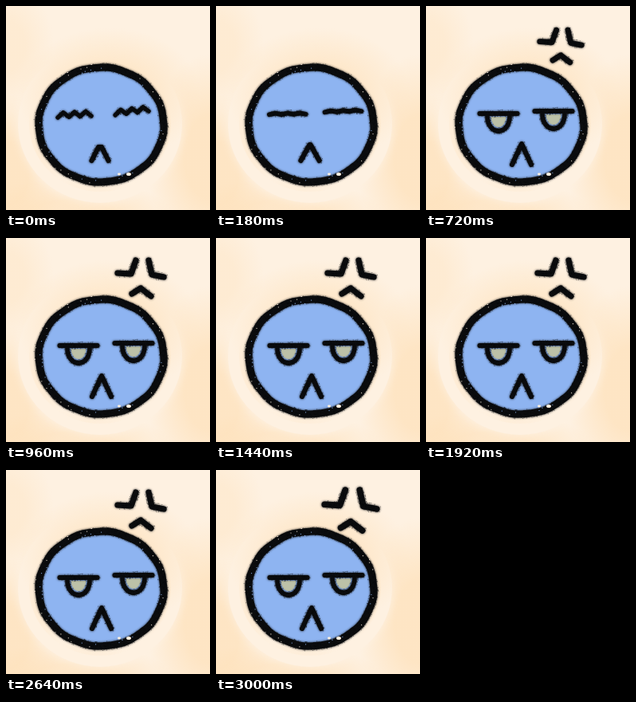
An HTML page with a canvas for the animation above (3.03 s loop, 256x256 px).

```html
<!DOCTYPE html>
<html lang="en">
<head>
<meta charset="utf-8">
<title>Annoyed face</title>
<style>
html, body { margin: 0; width: 100%; height: 100%; overflow: hidden; background: #fef0df; }
canvas { display: block; width: 100vw; height: 100vh; }
</style>
</head>
<body>
<canvas id="stage" width="256" height="256"></canvas>
<script>
const ctx = document.getElementById('stage').getContext('2d');
const LOOP = 3030, INK = '#0b0c0e', CREAM = '#fef1e1', BLUE = '#8eb4f1', IRIS = '#bcc1a8';
const HEAD = { x: 119.5, y: 149, rx: 78.5, ry: 72 };

let seed = 1;
const rand = () => (seed = seed * 16807 % 2147483647) / 2147483647;
const clamp = v => Math.min(1, Math.max(0, v));
const mix = (a, b, p) => a + (b - a) * p;
const points = (n, f) => Array.from({ length: n + 1 }, (_, i) => f(i / n, i));
const onHead = (a, off) => [HEAD.x + (HEAD.rx + off) * Math.cos(a), HEAD.y + (HEAD.ry + off) * Math.sin(a)];

function disc(x, y, rx, ry, color, end = Math.PI * 2) {
  ctx.fillStyle = color;
  ctx.beginPath();
  ctx.ellipse(x, y, rx, ry, 0, 0, end);
  ctx.fill();
}

// Charcoal line: a soft core with loose grains around it
function charcoal(pts, width, core = 0.75) {
  ctx.strokeStyle = ctx.fillStyle = ctx.shadowColor = INK;
  ctx.lineCap = ctx.lineJoin = 'round';
  ctx.lineWidth = width * core;
  ctx.shadowBlur = 3;
  ctx.beginPath();
  pts.forEach(([x, y]) => ctx.lineTo(x, y));
  ctx.stroke();
  ctx.shadowBlur = 0;
  ctx.globalAlpha = 0.5;
  seed = 77;
  for (let i = 1; i < pts.length; i++) {
    const [x0, y0] = pts[i - 1], [x1, y1] = pts[i];
    for (let n = Math.hypot(x1 - x0, y1 - y0) * 4; n > 0; n--) {
      const p = rand(), a = rand() * 7, r = Math.sqrt(rand()) * (width / 2 + 0.8);
      ctx.fillRect(mix(x0, x1, p) + Math.cos(a) * r - 0.5, mix(y0, y1, p) + Math.sin(a) * r - 0.5, 1, 1);
    }
  }
  ctx.globalAlpha = 1;
}

function glow(x, y, rx, ry, alpha) {
  ctx.save();
  ctx.translate(x, y);
  ctx.scale(rx, ry);
  const g = ctx.createRadialGradient(0, 0, 0.4, 0, 0, 1);
  g.addColorStop(0, `rgba(254,224,184,${alpha})`);
  g.addColorStop(1, 'rgba(254,224,184,0)');
  ctx.fillStyle = g;
  ctx.fillRect(-1, -1, 2, 2);
  ctx.restore();
}

function backdrop() {
  ctx.fillStyle = CREAM;
  ctx.fillRect(0, 0, 256, 256);
  glow(0, 50, 60, 80, 0.35);
  glow(0, 210, 70, 100, 0.7);
  glow(256, 190, 80, 130, 0.7);
  glow(80, 262, 130, 45, 0.6);
  ctx.strokeStyle = ctx.shadowColor = CREAM;
  ctx.shadowBlur = 12;
  ctx.lineWidth = 14;
  ctx.beginPath();
  ctx.ellipse(118, 148, 96, 92, 0, 0, 7);
  ctx.stroke();
  ctx.shadowBlur = 0;
  glow(130, 112, 115, 85, 0.6);
}

function head() {
  disc(HEAD.x, HEAD.y, HEAD.rx, HEAD.ry, BLUE);
  charcoal(points(90, p => onHead(p * Math.PI * 2, Math.sin(p * 75) * 0.4)), 10.2, 0.88);
  // Worn spots in the rim
  seed = 5;
  for (let i = 0; i < 45; i++) {
    const off = mix(-5, 5, rand());
    const [x, y] = onHead(rand() * 7, off);
    disc(x, y, 0.6, 0.6, off < 0 ? BLUE : CREAM);
  }
  disc(154, 211, 3, 2, CREAM);
  disc(142, 211, 2, 1.4, CREAM);
}

// A zigzag squint that flattens into a lid, then opens
function eye(x, y, squintX, tilt, flat, open) {
  if (open > 0) {
    disc(x, y + 4, 9.5, 13, IRIS, Math.PI);
    for (const side of [-1, 1])
      charcoal(points(8, p => {
        const a = p * open * Math.PI / 2;
        return [x + side * 14 * Math.cos(a), y + 4 + 18 * Math.sin(a)];
      }), 7.5);
  }
  const mid = mix(squintX, x, flat), half = mix(21, 23.5, flat), lift = 1 - flat;
  charcoal(points(6, (p, i) => [
    mid + half * (2 * p - 1),
    y + lift * (2 + (i % 2 ? -3 : 3) - tilt * p)
  ]), mix(7, 8, flat));
}

function mouth(flat, rise) {
  const x = 118 + rise * 2, blunt = 2 * (1 - flat), top = 177 - 4 * flat;
  const spread = 10.5 + flat * 1.5, foot = 194 + rise * 5;
  charcoal([[x - spread, foot], [x - blunt, top], [x + blunt, top], [x + spread, foot]], 8);
}

// Three chevrons that swell around a shared hub
const HUB = [169, 50];
const CHEVRONS = [
  [[140, 44], [157, 45], [163, 28]],
  [[179, 28], [183, 46], [198, 49]],
  [[158, 70], [169, 63], [182, 73]]
];
function temper(size) {
  for (const chevron of CHEVRONS)
    charcoal(chevron.map(pt => pt.map((v, k) => mix(HUB[k], v, size))), 5 + 4.5 * size);
}

// Poses are held, as in hand-drawn animation
function hold(t) {
  if (t >= 240 && t < 480) return 240;
  const step = t < 120 ? 30 : t < 840 ? 60 : 120;
  return Math.floor(t / step) * step;
}

function draw(t) {
  const flat = clamp(t / 240), rise = clamp((t - 480) / 240);
  const open = t < 480 ? 0 : mix(0.5, 1, rise);
  backdrop();
  head();
  eye(91, 135, 86, 2, flat, open);
  eye(160, 132, 158, 5, flat, open);
  mouth(flat, rise);
  if (t < 480) return;
  const small = t >= 960 && t / 120 % 2 === 0;
  temper(small ? 1 : mix(0.45, 1.13, clamp((t - 480) / 360)));
}

const start = performance.now();
function frame() {
  draw(hold((performance.now() - start) % LOOP));
  requestAnimationFrame(frame);
}
frame();
</script>
</body>
</html>
```
